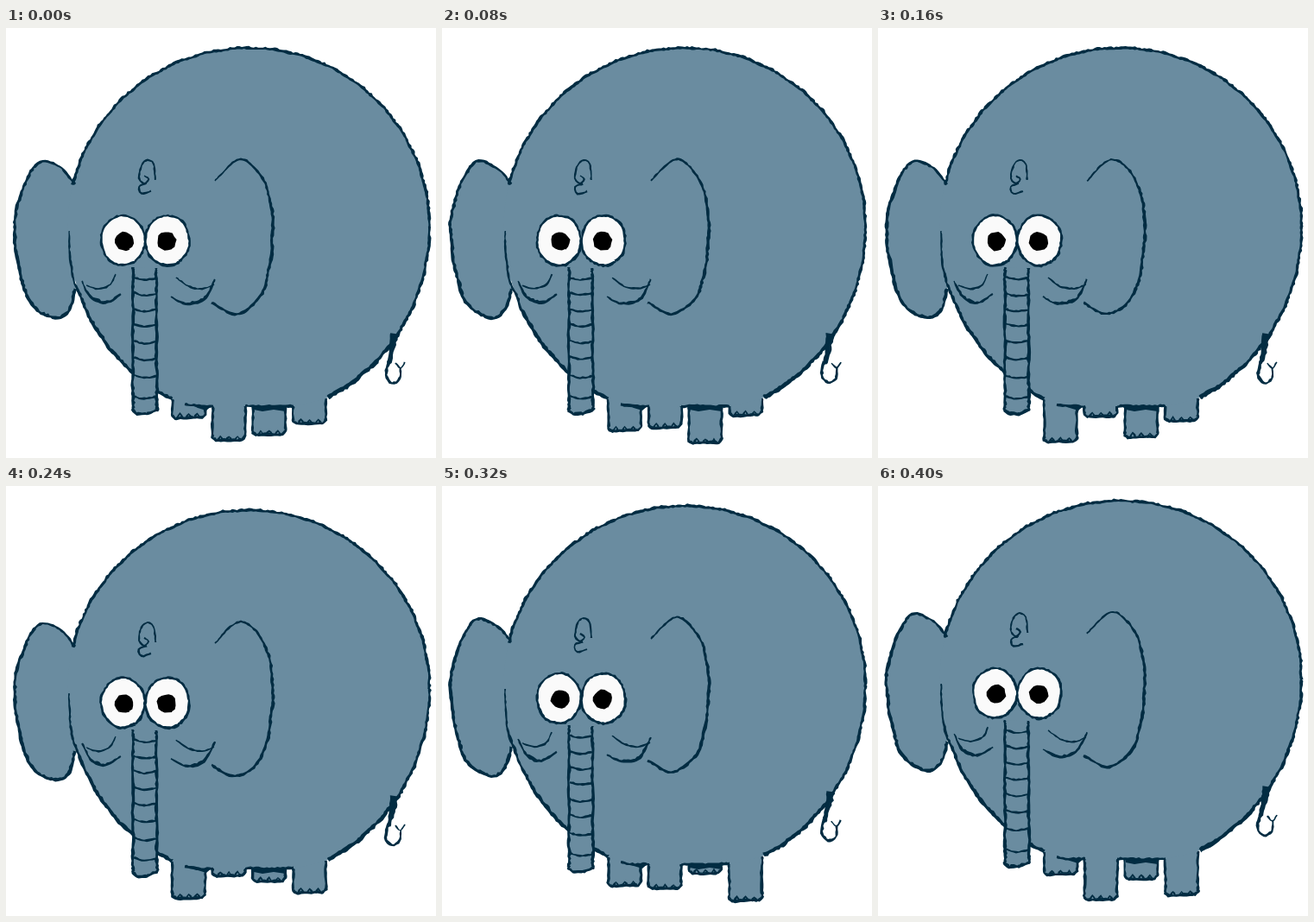
Write an HTML page that moves like this. It is 498x498 px and loops after 480 ms.

```html
<!DOCTYPE html>
<html lang="en">
<head>
<meta charset="utf-8">
<title>Walking elephant</title>
<style>
  html, body { margin: 0; width: 100%; height: 100%; overflow: hidden; background: #fff; }
  svg { display: block; width: 100vw; height: 100vh; }
</style>
</head>
<body>
<svg id="stage" viewBox="0 0 498 498"></svg>
<script>
const SKIN = '#6a8ca0', INK = '#022c42', WHITE = '#fafafa';
const STEP = 80, TAU = Math.PI * 2;
const BOBS = [0, 0, 0, 5, 0, -6];
const STRIDES = [2.4, 5.4, 1.1, 4.1]; // step at which each foot is lowest
const BODY = { x: 281, y: 230, rx: 209.5, top: 207, bottom: 220, belly: 438 };

let seed = 1;
function rand() {
  seed = (seed + 0x6D2B79F5) | 0;
  let r = Math.imul(seed ^ (seed >>> 15), 1 | seed);
  r = (r + Math.imul(r ^ (r >>> 7), 61 | r)) ^ r;
  return ((r ^ (r >>> 14)) >>> 0) / 4294967296;
}
const jitter = size => (rand() * 2 - 1) * size;

const parse = s => typeof s === 'string' ? s.split(' ').map(p => p.split(',').map(Number)) : s;

// Samples a spline through the points; tension 0 gives straight segments.
function curve(source, tension = 0.5) {
  const p = parse(source), out = [];
  for (let i = 0; i < p.length - 1; i++) {
    const b = p[i], c = p[i + 1], a = p[i - 1] || b, d = p[i + 2] || c;
    const n = Math.max(2, Math.ceil(Math.hypot(c[0] - b[0], c[1] - b[1]) / 3));
    for (let j = 0; j < n; j++) {
      const t = j / n, t2 = t * t, t3 = t2 * t;
      out.push([0, 1].map(k =>
        (2 * t3 - 3 * t2 + 1) * b[k] + (3 * t2 - 2 * t3) * c[k] +
        tension * ((t3 - 2 * t2 + t) * (c[k] - a[k]) + (t3 - t2) * (d[k] - b[k]))));
    }
  }
  out.push(p[p.length - 1]);
  return out;
}

function shape(points, color) {
  const d = points.map(p => p[0].toFixed(1) + ' ' + p[1].toFixed(1)).join('L');
  return `<path fill="${color}" d="M${d}Z"/>`;
}
const area = (source, tension) => shape(curve(source, tension), SKIN);

// A ragged ink stroke whose width runs from start over mid to end.
function brush(source, start, mid = start, end = start, tension = 0.5) {
  const p = curve(source, tension), left = [], right = [];
  const phase = rand() * TAU, last = p.length - 1;
  p.forEach(([x, y], i) => {
    const a = p[Math.max(0, i - 1)], b = p[Math.min(last, i + 1)];
    const dx = b[0] - a[0], dy = b[1] - a[1], len = Math.hypot(dx, dy) || 1;
    const t = i / last * 2;
    const w = t < 1 ? start + (mid - start) * t : mid + (end - mid) * (t - 1);
    const rough = Math.min(1, w * 0.28);
    const sway = Math.sin(i * 0.45 + phase) * rough * 0.4;
    const l = w / 2 + sway + jitter(rough), r = w / 2 - sway + jitter(rough * 0.6);
    left.push([x + dy / len * l, y - dx / len * l]);
    right.unshift([x - dy / len * r, y + dx / len * r]);
  });
  return shape(left.concat(right), INK);
}

// Part of the egg-shaped, flat-bottomed body outline, in degrees clockwise from the right.
function bodyArc(from, to) {
  const n = Math.ceil(Math.abs(to - from) / 6);
  return Array.from({ length: n + 1 }, (_, i) => {
    const a = (from + (to - from) * i / n) / 360 * TAU, s = Math.sin(a);
    const y = BODY.y + s * (s < 0 ? BODY.top : BODY.bottom);
    return [BODY.x + Math.cos(a) * BODY.rx, Math.min(y, BODY.belly)];
  });
}
const under = x =>
  Math.min(BODY.belly, BODY.y + BODY.bottom * Math.sqrt(1 - ((x - BODY.x) / BODY.rx) ** 2));
const bellyLine = (a, b) => brush([a, (a + b) / 2, b].map(x => [x, under(x)]), 3);

function oval(cx, cy, rx, ry, rough = 0) {
  const n = 16;
  return Array.from({ length: n + 1 }, (_, i) => {
    const a = i % n / n * TAU + 1, k = 1 + jitter(rough);
    return [cx + Math.cos(a) * rx * k, cy + Math.sin(a) * ry * k];
  });
}

function leg(i, step, bob) {
  const x = 192.5 + 46.7 * i, end = x + 38;
  const y = 465 + 16 * Math.cos((step - STRIDES[i]) / BOBS.length * TAU);
  const line = [[x, under(x) + bob], [x, y - 3], [x + 4, y], [end - 4, y - 1],
    [end, y - 5], [end, under(end) + bob]];
  let out = area(line, 0) + brush(line, 2.8, 3.4, 2.8, 0);
  for (let toe = x + 9; toe < end; toe += 10) {
    out += brush([[toe - 3, y], [toe, y - 5], [toe + 3, y]], 2.2);
  }
  return out;
}

function shadows() {
  return shape(parse('207,432 222,440 232,443 240,436'), INK) +
    shape(parse('286,434 287,442 297,444 310,442 324,444 324,434'), INK);
}

function torso() {
  const ear = '80,181 62,161 34,159 10,225 24,310 54,335 72,328 80,302';
  const chest = parse('73,235 74,265 78,290').concat(bodyArc(159, 115));
  return area(ear) + shape(curve(bodyArc(0, 360)), SKIN) +
    brush(ear, 2.6, 3.8, 3.6) + brush(bodyArc(193.5, 360), 3.2) +
    brush(bodyArc(0, 64), 3, 3.6, 5) + brush(chest, 1.6, 4, 4) +
    bellyLine(207, 240) + bellyLine(277, 333);
}

function tail() {
  return brush('450,354 447,372 443,389', 10, 7, 4) +
    brush('443,386 440,402 447,411 456,406 457,393', 3.6, 3.2, 2) +
    brush('451,388 457,394 462,387', 1.8);
}

function trunk() {
  const line = '147,277 147,443 152,447 163,447 175,442 174,278';
  let out = area(line, 0) + brush(line, 3, 3.6, 3, 0);
  for (let i = 0; i < 8; i++) {
    const y = 290 + 18 * i + 11 * (i / 7) ** 5 + jitter(0.8);
    out += brush([[148, y - 1], [160, y + 2], [174, y]], 2.4);
  }
  return out;
}

function eye(cx, px) {
  return shape(curve(oval(cx, 246, 25.5, 29)), WHITE) +
    brush(oval(cx, 246, 25.5, 29, 0.012), 3.2, 2.4, 3.2) +
    shape(oval(px, 247, 11, 11, 0.07), '#000');
}

function face() {
  return brush('242,177 272,152 300,180 309,235 298,304 268,331 238,318', 1.8, 3.6, 2.8) +
    brush('173,176 171,158 164,153 157,159 154,174 160,180 165,175 160,171', 2) +
    brush('163,180 154,184 157,192 168,189', 2.2) +
    brush('127,285 121,297 107,302 93,298', 1.6, 2.4, 1.4) +
    brush('88,293 98,311 115,318 133,308', 1.6, 4, 2) +
    brush('197,289 211,299 227,302 241,297', 1.5, 2.4, 1.6) +
    brush('191,311 208,319 229,314 242,291', 1.6, 4, 1.8) +
    trunk() + eye(135.5, 137) + eye(187, 186);
}

function scene(step) {
  const bob = BOBS[step];
  const bobbing = art => `<g transform="translate(0 ${bob})">${art}</g>`;
  seed = 100 + step * 37;
  return leg(0, step, bob) + leg(2, step, bob) + bobbing(shadows() + torso() + tail()) +
    leg(1, step, bob) + leg(3, step, bob) + bobbing(face());
}

const stage = document.getElementById('stage');
let shown = -1;
function draw(time) {
  const step = Math.floor(time / STEP) % BOBS.length;
  if (step !== shown) {
    stage.innerHTML = scene(step);
    shown = step;
  }
}

let begin;
function tick(now) {
  begin ??= now;
  draw(now - begin);
  requestAnimationFrame(tick);
}
draw(0);
requestAnimationFrame(tick);
</script>
</body>
</html>
```
